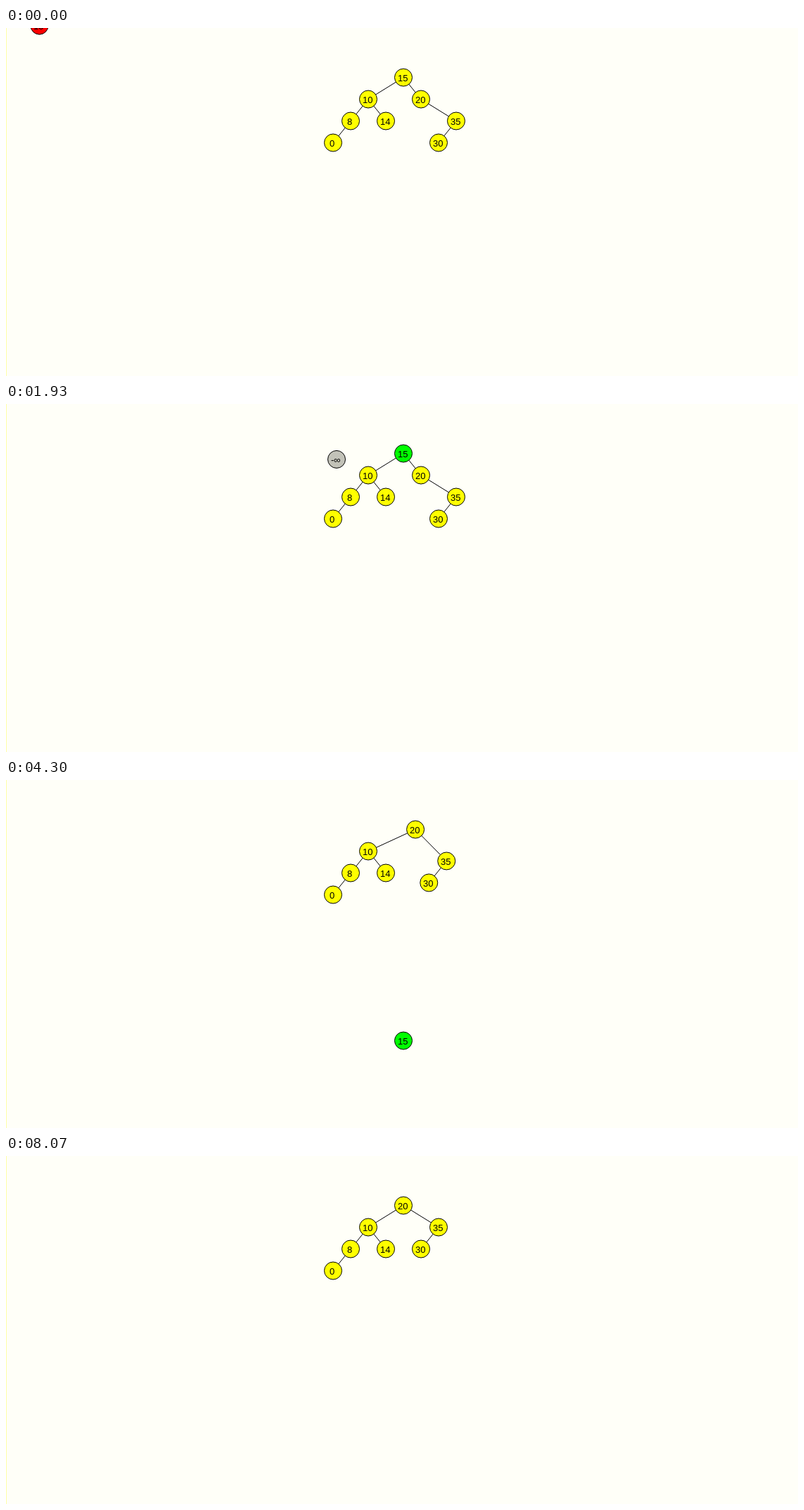
Recreate the animation shown at these times as an HTML page with a canvas. Size 1126x496 px, loop 8110 ms.

```html
<!DOCTYPE html>
<html lang="en">
<head>
<meta charset="utf-8">
<title>Search tree deletion</title>
<style>
  html, body { margin: 0; width: 100%; height: 100%; overflow: hidden; background: #fffff8; }
  canvas { display: block; }
</style>
</head>
<body>
<canvas id="stage" width="1126" height="496"></canvas>
<script>
const ctx = document.getElementById("stage").getContext("2d");
const LOOP = 8110, TICK = 100 / 3, STEPS = 20;
const YELLOW = "#ffff00", RED = "#ff0000", GREEN = "#00ff00", GRAY = "#c2c2b8";

// Tick at which each part of the deletion begins
const ENTER = -2, FOUND = 32, SEEK = 42, LIFT = 78, REPLACE = 118, FALL = 118.4;
const FALL_SPEED = 28.4;

const START = [-10, -12], ROOT = [565, 70], BESIDE = [603, 70];
const RIGHT = [590, 101], LOW = [640, 132], LEAF = [615, 163];

function glide(from, to, ticks) {
  const part = Math.max(0, Math.min(1, ticks / STEPS));
  return from.map((p, i) => p + (to[i] - p) * part);
}

function edge(a, b) {
  ctx.beginPath();
  ctx.moveTo(a[0], a[1] + 0.5);
  ctx.lineTo(b[0], b[1] + 0.5);
  ctx.stroke();
}

function node(label, [x, y], fill = YELLOW) {
  ctx.beginPath();
  ctx.arc(x, y + 0.5, 12.5, 0, 2 * Math.PI);
  ctx.fillStyle = fill;
  ctx.fill();
  ctx.stroke();
  ctx.fillStyle = "#000";
  const left = x - 1 - ctx.measureText(label).width / 2;
  ctx.fillText(label, Math.round(left), Math.round(y) + 6);
}

function draw(time) {
  const tick = Math.floor((time % LOOP + 3.4) / TICK);
  const lifted = tick >= LIFT, replaced = tick >= REPLACE;
  const settle = (from, to) => glide(from, to, tick - REPLACE);

  const tree = {
    10: [515, 101], 8: [490, 132], 14: [540, 132], 0: [465, 163],
    20: replaced ? settle(BESIDE, ROOT) : glide(RIGHT, BESIDE, tick - LIFT),
    35: settle(LOW, [615, 101]),
    30: settle(LEAF, [590, 132])
  };
  const old = [ROOT[0], ROOT[1] + Math.max(0, tick - FALL) * FALL_SPEED];
  const top = replaced ? tree[20] : old;

  ctx.fillStyle = "#fffff8";
  ctx.fillRect(0, 0, 1126, 496);
  ctx.fillStyle = "#ffffa8";
  ctx.fillRect(0, 0, 1, 496);

  ctx.strokeStyle = "#000";
  ctx.lineWidth = 1;
  ctx.font = "13px 'Liberation Sans', Arial, sans-serif";

  // Once lifted, 20 is unlinked and 35 hangs from the top node
  edge(top, tree[10]);
  if (lifted) edge(top, tree[35]);
  else {
    edge(top, tree[20]);
    edge(tree[20], tree[35]);
  }
  for (const [a, b] of [[10, 8], [10, 14], [8, 0], [35, 30]]) edge(tree[a], tree[b]);

  for (const key in tree) node(key, tree[key]);
  if (old[1] < 510) node("15", old, tick < FOUND ? YELLOW : GREEN);

  if (tick < FOUND) node("15", glide(START, ROOT, tick - ENTER), RED);
  if (tick >= SEEK && !lifted) node("-∞", glide(START, RIGHT, tick - SEEK), GRAY);
}

function frame() {
  draw(performance.now());
  requestAnimationFrame(frame);
}
frame();
</script>
</body>
</html>
```
